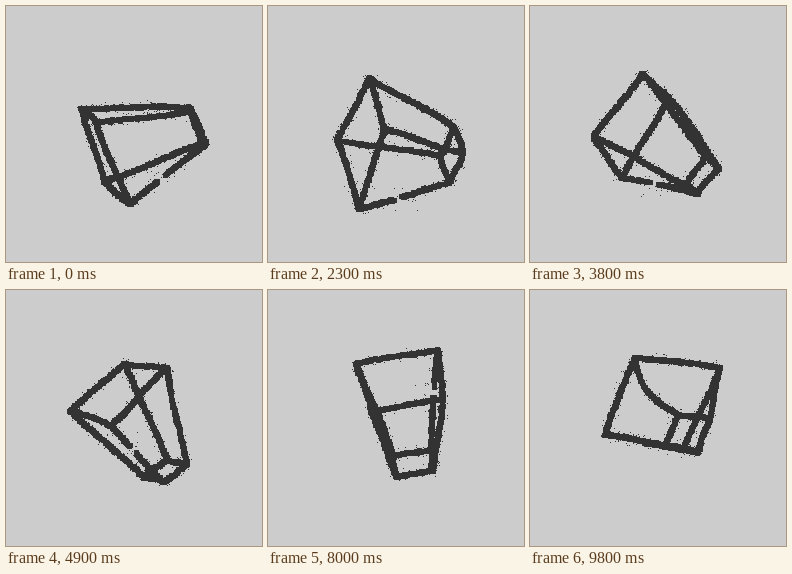
An HTML page with a canvas for the animation above (10 s loop, 256 by 256 pixels).

```html
<!DOCTYPE html>
<html>
<head>
<meta charset="utf-8">
<style>
  html, body { margin: 0; width: 100%; height: 100%; overflow: hidden; background: #ccc; }
  canvas { display: block; width: 100%; height: 100%; image-rendering: pixelated; }
</style>
</head>
<body>
<canvas id="stage" width="256" height="256"></canvas>
<script>
const ctx = document.getElementById('stage').getContext('2d');

// Step, then x,y of the large face's corners and of the small face's corners.
const poses = [
  [0, 76,103, 90,117, 124,198, 98,175, 183,102, 185,105, 200,139, 197,137],
  [21, 101,72, 117,123, 91,203, 69,134, 186,121, 195,147, 183,176, 172,150],
  [35, 113,68, 139,92, 92,172, 63,131, 175,150, 189,163, 167,188, 156,180],
  [45, 119,74, 161,78, 105,136, 64,121, 161,169, 181,174, 157,192, 138,187],
  [59, 139,84, 178,83, 112,98, 73,94, 153,181, 171,183, 138,188, 124,186],
  [73, 170,60, 175,109, 103,122, 88,74, 163,160, 165,181, 129,187, 125,166],
  [90, 190,78, 153,160, 75,145, 105,68, 180,130, 168,162, 135,156, 148,125]
];
const last = poses.length - 1;

function secant(i, k) {
  return (poses[i + 1][k] - poses[i][k]) / (poses[i + 1][0] - poses[i][0]);
}

function slope(i, k) {
  if (i === 0) return 2 * secant(0, k) - slope(1, k);
  if (i === last) return 2 * secant(last - 1, k) - slope(last - 1, k);
  const before = poses[i][0] - poses[i - 1][0];
  const after = poses[i + 1][0] - poses[i][0];
  return (after * secant(i - 1, k) + before * secant(i, k)) / (before + after);
}

// Smooth cubic path of coordinate k.
function coord(step, k) {
  let i = 0;
  while (i < last - 1 && step > poses[i + 1][0]) i++;
  const span = poses[i + 1][0] - poses[i][0];
  const u = (step - poses[i][0]) / span, v = 1 - u;
  return poses[i][k] * v * v * (1 + 2 * u) + poses[i + 1][k] * u * u * (3 - 2 * u)
    + span * u * v * (slope(i, k) * v - slope(i + 1, k) * u);
}

function seeded(seed) {
  let s = seed * 7919 + 17;
  return () => {
    s = (s + 0x6D2B79F5) | 0;
    let r = Math.imul(s ^ (s >>> 15), 1 | s);
    r ^= r + Math.imul(r ^ (r >>> 7), 61 | r);
    return ((r ^ (r >>> 14)) >>> 0) / 4294967296;
  };
}

function roughLine(p, q, rand, fuzz, sag, torn) {
  const bell = () => (rand() + rand() + rand() - 1.5) * 2;
  const dot = (x, y, size) =>
    ctx.fillRect(Math.round(x - size / 2), Math.round(y - size / 2), size, size);
  const dx = q[0] - p[0], dy = q[1] - p[1];
  const len = Math.hypot(dx, dy) || 1;
  const nx = -dy / len, ny = dx / len;
  const bow = (rand() - 0.5) * 3 + sag, wave = (rand() - 0.5) * 2;
  const count = Math.ceil(len * 1.5);
  for (let i = 0; i <= count; i++) {
    const t = i / count;
    const off = bow * Math.sin(Math.PI * t) + wave * Math.sin(2 * Math.PI * t);
    const x = p[0] + dx * t + nx * off, y = p[1] + dy * t + ny * off;
    const tear = torn ? Math.exp(-(((t - 0.42) * len / 5) ** 2)) : 0;
    if (tear < 0.5) dot(x + bell() * 0.5, y + bell() * 0.5, 5);
    const spread = fuzz + tear * 10;
    if (rand() < 0.75) dot(x + bell() * spread, y + bell() * spread, 1);
  }
}

function draw(step) {
  const rand = seeded(step + 1);
  const pt = n => [coord(step, 1 + 2 * n), coord(step, 2 + 2 * n)];
  const fuzz = 2.7 - 1.3 * Math.exp(-(((step - 60) / 9) ** 2));
  const near = step < 52 ? 2 : 0;
  ctx.fillStyle = '#ccc';
  ctx.fillRect(0, 0, 256, 256);
  ctx.fillStyle = '#333';
  for (let n = 0; n < 4; n++) {
    const next = (n + 1) % 4;
    const sag = n === 3 ? Math.max(0, step - 80) : 0;
    roughLine(pt(n), pt(next), rand, fuzz, 0, false);
    roughLine(pt(n + 4), pt(next + 4), rand, fuzz, 0, false);
    roughLine(pt(n), pt(n + 4), rand, fuzz, sag, n === near && step < 80);
  }
}

const start = performance.now();
let shown = -1;

function tick() {
  const tenth = Math.floor((performance.now() - start) % 10000 / 100);
  const step = tenth - Math.floor(tenth / 11); // every eleventh tenth holds
  if (step !== shown) draw(shown = step);
  requestAnimationFrame(tick);
}
tick();
</script>
</body>
</html>
```
